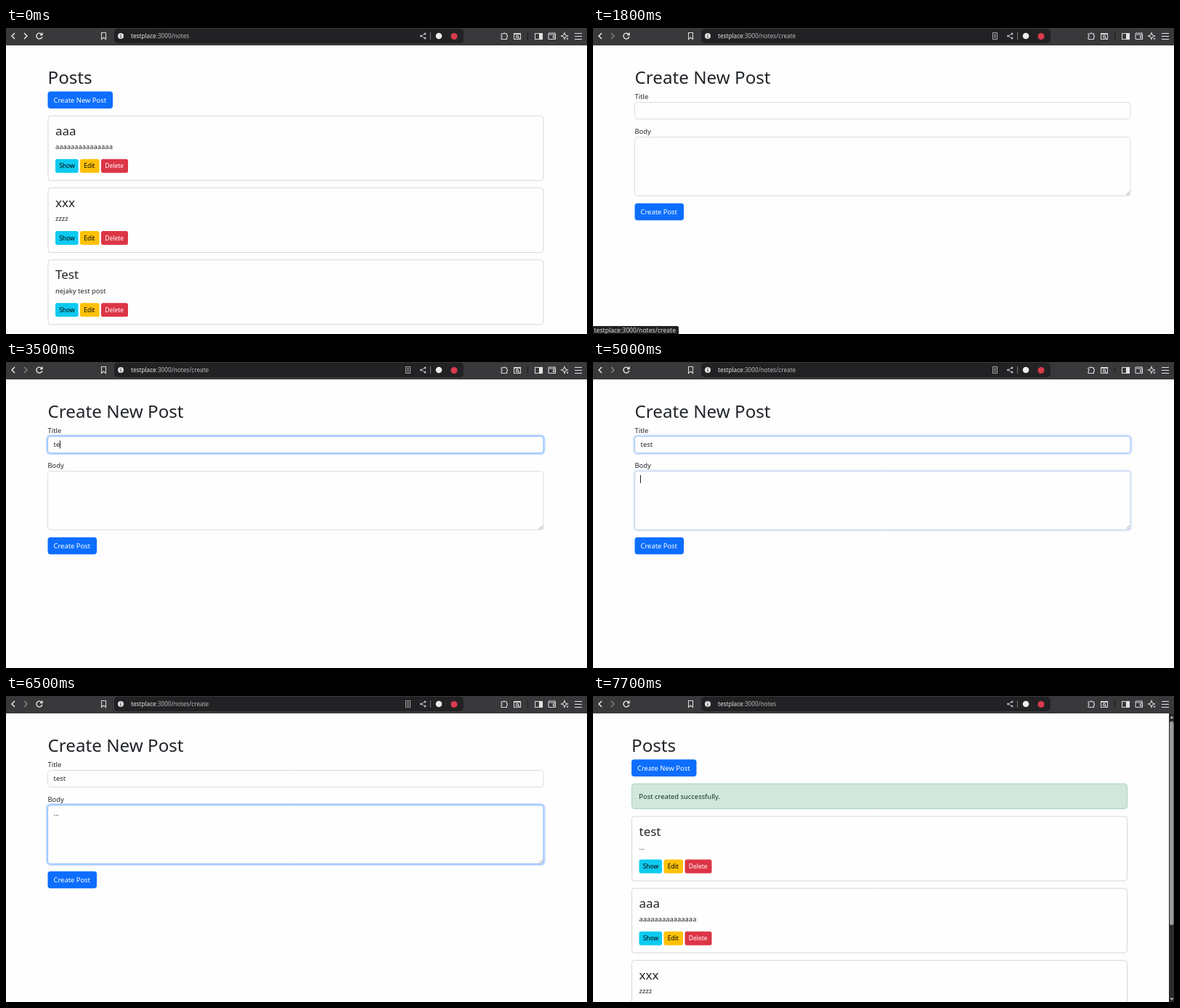
Recreate the animation shown at these times as an HTML page with a canvas. Size 800 px wide and 422 px high, loop 8000 ms.

```html
<!DOCTYPE html>
<html lang="en">
<head>
<meta charset="utf-8">
<title>Posts</title>
<style>
html, body { margin: 0; width: 100%; height: 100%; overflow: hidden; background: #fefefe; }
canvas { display: block; }
</style>
</head>
<body>
<canvas id="stage" width="800" height="422"></canvas>
<script>
const ctx = document.getElementById('stage').getContext('2d');
const LOOP = 8000, STEP = 100;
const INK = '#212529', BLUE = [13, 110, 253], DARK_BLUE = [11, 94, 215];
const SITE = 'testplace', LIST = ':3000/notes', FORM = LIST + '/create';
const POSTS = [['aaa', 'a'.repeat(15)], ['xxx', 'zzzz'], ['Test', 'nejaky test post']];
const ACTIONS = [
  ['Show', 10.5, 31.5, '#0dcaf0', '#000'],
  ['Edit', 44.5, 26.5, '#ffc107', '#000'],
  ['Delete', 73.5, 37, '#dc3545', '#fff']
];

const ramp = (t, a, b) => Math.min(1, Math.max(0, (t - a) / (b - a)));
const within = (t, ...spans) => spans.some(([a, b]) => t >= a && t < b);
const mix = (a, b, k) => `rgb(${a.map((v, i) => Math.round(v + (b[i] - v) * k))})`;

function text(s, x, y, size = 9.4, color = INK, align = 'left') {
  ctx.font = `${size}px "Noto Sans", "Open Sans", sans-serif`;
  ctx.fillStyle = color;
  ctx.textAlign = align;
  ctx.fillText(s, x, y);
  return ctx.measureText(s).width;
}

function box(x, y, w, h, r, fill, stroke, line = 1) {
  ctx.beginPath();
  ctx.roundRect(x, y, w, h, r);
  if (fill) { ctx.fillStyle = fill; ctx.fill(); }
  if (stroke) { ctx.strokeStyle = stroke; ctx.lineWidth = line; ctx.stroke(); }
}

function icon(path, color = '#d8d8da', line = 1.1) {
  ctx.strokeStyle = color;
  ctx.lineWidth = line;
  ctx.stroke(new Path2D(path));
}

function dot(x, y, r, color) {
  ctx.fillStyle = color;
  ctx.beginPath();
  ctx.arc(x, y, r, 0, 7);
  ctx.fill();
}

function toolbar(path, canForward, hasReader) {
  ctx.fillStyle = '#39393b';
  ctx.fillRect(0, 0, 800, 24);
  icon('M12 7L8 11L12 15', '#f0f0f0', 1.4);
  icon('M25 7L29 11L25 15', canForward ? '#f0f0f0' : '#858588', 1.4);
  icon('M49 8.5A4 4 0 1 0 49.8 12M50 6.5V9.5H47', '#f0f0f0', 1.3);
  icon('M131.5 6.5H137.5V15.5L134.5 13L131.5 15.5Z');
  box(149, 1, 481, 20, 5, '#222224');
  dot(158, 11, 4, '#e2e2e4');
  icon('M158 8.5V9.5M158 10.5V13.5', '#222224', 1);
  const w = text(SITE, 172, 14, 8.2, '#e6e6e8');
  text(path, 172 + w, 14, 8.2, '#b9b9bc');
  if (hasReader) icon('M550.5 6.5H556.5V15.5H550.5ZM552 9H555M552 11H555M552 13H555', '#b8b8bb', 0.9);
  icon('M577 8L571.5 11L577 14', '#b8b8bb', 0.9);
  for (const [x, y] of [[577, 8], [571.5, 11], [577, 14]]) dot(x, y, 1.5, '#b8b8bb');
  icon('M584.5 6V16', '#77777a', 1);
  dot(596, 11, 4.3, '#eeeeee');
  dot(617, 11.5, 4.5, '#d93a4d');
  icon('M682 8H684.5A1.7 1.7 0 0 1 687.5 8H689.5V10A1.7 1.7 0 0 1 689.5 13V15.5H682V13A1.6 1.6 0 0 0 682 10Z');
  icon('M699.5 15.5V7.5H708.5V15.5ZM699.5 8.5H708.5M705.5 12A1.6 1.6 0 1 0 702.3 12A1.6 1.6 0 1 0 705.5 12M705.2 13L707 14.6');
  icon('M718.5 6V16', '#19191a', 1);
  icon('M728.5 7.5H738.5V15.5H728.5Z');
  box(734, 7, 4.5, 9, 0, '#e4e4e6');
  icon('M756 9V7H748Q747 7 747 8V14.5Q747 15.5 748 15.5H756.5V9H748M756.5 11H753.5V13.5H756.5');
  icon('M769 6.5L770.3 9.7L773.5 11L770.3 12.3L769 15.5L767.7 12.3L764.5 11L767.7 9.7ZM773 13.5V16M771.8 14.7H774.2');
  icon('M783 7.5H793M783 11.5H793M783 15.5H793', '#e4e4e6', 1.2);
}

function mainButton(label, x, y, w, hover) {
  box(x, y, w, 23.5, 3.7, mix(BLUE, DARK_BLUE, hover));
  text(label, x + 8, y + 15.2, 9.4, '#fff');
}

function card(x, y, [title, body]) {
  box(x + 0.5, y + 0.5, 682, 89, 3.7, '#fefefe', '#d6d7d8');
  text(title, x + 10.5, y + 27, 17);
  text(body, x + 10.5, y + 46.3);
  for (const [label, dx, w, fill, color] of ACTIONS) {
    box(x + dx, y + 60, w, 19, 2.5, fill);
    text(label, x + dx + 5.2, y + 72.5, 8.5, color);
  }
}

function listPage(x, hover, posts, top) {
  text('Posts', x, 76.5, 24.2);
  mainButton('Create New Post', x, 87.4, 89.5, hover);
  posts.forEach((post, i) => card(x, top + i * 99.3, post));
}

function scrollbar() {
  ctx.fillStyle = '#2b2b2c';
  ctx.fillRect(793, 24, 7, 398);
  box(794, 35, 5.5, 281, 2.7, '#9b9b9c');
  ctx.fillStyle = '#b5b5b6';
  ctx.fill(new Path2D('M794.5 31L797 27.5L799.5 31ZM794.5 416.5L797 420L799.5 416.5Z'));
}

function field(y, h, focus) {
  if (focus > 0) box(56.3, y - 1.2, 685, h + 2.4, 5, null, `rgba(13,110,253,${0.25 * focus})`, 2.6);
  box(57.5, y, 682.5, h, 3.7, '#fefefe', mix([218, 222, 226], [134, 183, 254], focus));
}

function typed(s, baseline, caret) {
  const w = text(s, 65.5, baseline);
  if (caret) {
    ctx.fillStyle = INK;
    ctx.fillRect(Math.round(65 + w), baseline - 9, 1, 11);
  }
}

function formPage(t) {
  const title = t < 3500 ? '' : t < 3800 ? 'te' : t < 3900 ? 'tes' : 'test';
  const body = t < 5800 ? '' : t < 5900 ? '..' : '...';
  text('Create New Post', 57.5, 76.5, 24.2);
  text('Title', 57.5, 98.3);
  field(102.5, 23, ramp(t, 2300, 2700) - ramp(t, 4900, 5200));
  typed(title, 117.3, within(t, [2400, 3000], [3500, 4500]));
  text('Body', 57.5, 146);
  field(150.5, 81, ramp(t, 4900, 5200) - ramp(t, 7200, 7500));
  typed(body, 165, within(t, [5000, 5600], [5800, 6500], [7100, 7300]));
  icon('M734 230.5L739 225.5M737 230.5L739 228.5', '#77797b', 0.8);
  mainButton('Create Post', 57.5, 241.7, 67.5, ramp(t, 6600, 6900));
}

function status(alpha) {
  if (alpha <= 0) return;
  ctx.globalAlpha = alpha;
  box(-4, 411, 122, 15, 2.5, '#202123');
  text(SITE + FORM, 114, 420.3, 8.6, '#e0e0e2', 'right');
  ctx.globalAlpha = 1;
}

function draw(t) {
  const onForm = t >= 1600 && t < 7500;
  ctx.fillStyle = '#fefefe';
  ctx.fillRect(0, 0, 800, 422);
  if (onForm) {
    formPage(t);
  } else if (t < 1600) {
    listPage(57.5, ramp(t, 800, 1100), POSTS, 120.7);
  } else {
    listPage(53, 0, [['test', '...'], ...POSTS], 165.5);
    box(53.5, 121, 682, 34.5, 3.7, '#d1e7dd', '#a9d2bf');
    text('Post created successfully.', 63.3, 141.8, 9.4, '#0a3622');
    scrollbar();
  }
  toolbar(onForm ? FORM : LIST, t < 1600, onForm);
  status(ramp(t, 1200, 1400) - ramp(t, 1900, 2200));
}

function frame(now) {
  draw(Math.floor(now % LOOP / STEP) * STEP);
  requestAnimationFrame(frame);
}
requestAnimationFrame(frame);
</script>
</body>
</html>
```
